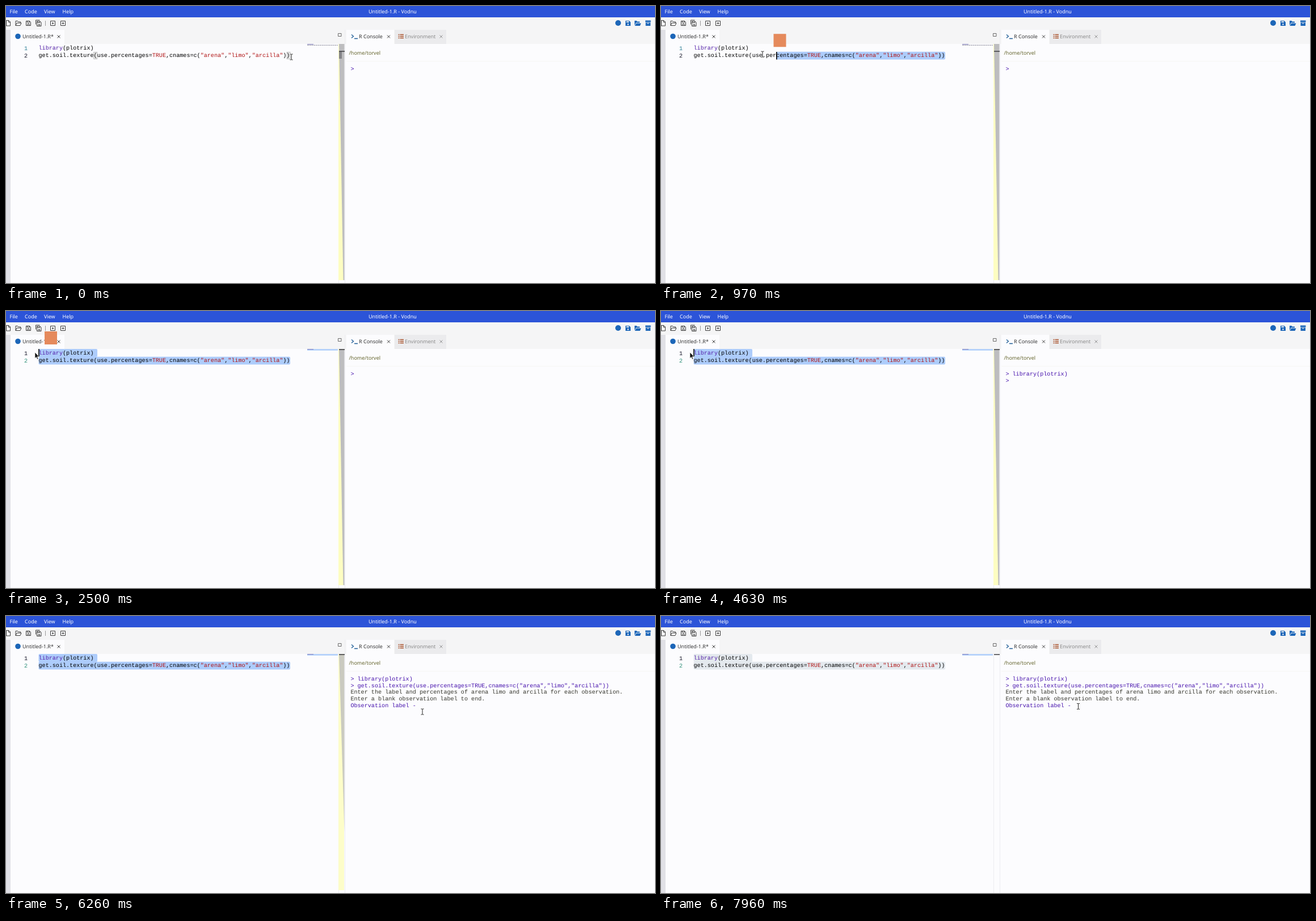
Write an HTML page that moves like this. It is 1144 px wide and 489 px high and loops after 8000 ms.

```html
<!DOCTYPE html>
<html lang="en">
<head>
<meta charset="utf-8">
<title>Soil texture in R</title>
<style>
  html, body { margin: 0; width: 100%; height: 100%; overflow: hidden; background: #fcfcfe; }
  svg { display: block; width: 1144px; height: 489px; }
  text { white-space: pre; text-rendering: geometricPrecision; }
  .ui { font: 9px "Noto Sans", "Open Sans", sans-serif; }
  .mono { font: 10.12px "Liberation Mono", monospace; }
  #console { font-size: 10.14px; }
  .line { fill: none; stroke: #3c3c3c; stroke-width: 1; }
  .blue { fill: #1c66b8; }
  .str { fill: #b01515; }
  .cmd { fill: #4510ac; }
  .out { fill: #35352c; }
</style>
</head>
<body>
<svg viewBox="0 0 1144 489">
  <!-- window chrome -->
  <rect width="1144" height="489" fill="#fcfcfe"/>
  <rect width="1144" height="20" fill="#2c54d8"/>
  <g class="ui" fill="#fff">
    <text x="6.5" y="13">File</text>
    <text x="33" y="13">Code</text>
    <text x="67" y="13">View</text>
    <text x="99.5" y="13">Help</text>
    <text x="639" y="13">Untitled-1.R - Vodnu</text>
  </g>
  <rect y="20" width="1144" height="47" fill="#f5f5f6"/>
  <rect y="42" width="8" height="447" fill="#e0e0e6"/>

  <!-- toolbar -->
  <g class="line">
    <path d="M.5 25.5h4.500l2.500 2.500v7h-7zM4.500 25.500v3h3"/>
    <path d="M17 34.500v-8h3.500l1.200 1.500h4v2M17 34.500l2-4.500h8l-2 4.500z"/>
    <path d="M35.500 26.500h6l2 2v6h-8zM37.500 26.500v2.500h4v-2.500M38 34v-2.500h3v2.500"/>
    <path d="M52.500 32.500v-7.500h7M54.500 27h5.500l2 2v6.500h-7.500zM56 27v2.500h3.500v-2.500M57 35v-2.500h2.500v2.500"/>
    <path d="M69.500 26v9" stroke="#999"/>
    <path d="M78.500 26.500h8v8h-8zM96.500 26.500h8v8h-8zM98.500 30.500h4M100.500 28.500v4"/>
    <path d="M81.500 28.500v4l3-2z" fill="#3c3c3c" stroke="none"/>
  </g>
  <g class="blue">
    <circle cx="1079" cy="30" r="5"/>
    <path d="M1092 26h6.500l2.500 2.500v6.500h-9z"/>
    <path d="M1108 34.500v-8.500h3.500l1.200 1.500h4.300v2h-6.500z"/>
    <path d="M1111 30.500h8.500l-2 4.500h-9z"/>
    <path d="M1127 25.500h9.500v3h-9.500zM1127.500 29.300h8.500v5.700h-8.500z"/>
    <path d="M1093.500 27h4.500v2h-4.500zM1130 30.300h3.500v1h-3.500z" fill="#f5f5f6"/>
    <circle cx="1096.500" cy="32.200" r="1.200" fill="#f5f5f6"/>
  </g>

  <!-- tabs -->
  <path d="M8 42h95v26h-95zM600 42h84v26h-84z" fill="#fcfcfe"/>
  <rect x="685" y="42" width="91" height="25" fill="#ebebed"/>
  <circle class="blue" cx="21" cy="53.500" r="4.800"/>
  <g class="ui" fill="#333">
    <text x="29" y="57">Untitled-1.R*</text>
    <text x="622" y="57">R Console</text>
    <text x="703" y="57" fill="#8a8a8a">Environment</text>
    <text x="604.500" y="86" fill="#66662f">/home/torvel</text>
  </g>
  <g class="line">
    <path id="x" d="M90.500 51.500l5 5m0-5l-5 5"/>
    <use href="#x" x="581.500"/>
    <use href="#x" x="674" opacity=".5"/>
    <path d="M585.500 48.500h5.500v5h-5.500z" stroke="#6a6a6a"/>
    <path d="M609 50.500l3.500 3-3.500 3M614 57.500h6" stroke="#1e5c96" stroke-width="1.300"/>
    <path d="M691.500 50.500h2m1 0h6.500M691.500 53.500h2m1 0h6.500M691.500 56.500h2m1 0h6.500" stroke="#a84f2a" stroke-width="1.700"/>
    <path d="M586.500 67v422M597.500 42v447" stroke="#ececf1"/>
    <path d="M600 97.500h544" stroke="#f6f6f3"/>
  </g>

  <!-- scrollbar -->
  <rect id="track" x="586" y="67" width="10" height="417" fill="#fdfdc2"/>
  <polygon id="thumb" fill="#bdbdbf"/>
  <rect id="bracketMark" x="587" y="80" width="5" height="13" fill="#858589"/>
  <rect id="lineMark" x="587" width="10" height="1.500" fill="#3d3d40"/>

  <!-- minimap -->
  <rect id="mapSel" x="531" y="67" width="54" height="2.800" fill="#b4d1fa"/>
  <path d="M531 67.700h11" stroke="#7a78ba"/>
  <path id="mapText" d="M531 69.200h54" stroke="#8d8d9d" stroke-dasharray="3 .7"/>

  <!-- editor -->
  <g id="sel">
    <rect id="sel1" y="67" height="14" rx="2"/>
    <rect id="sel2" y="80.700" height="13.800" rx="2"/>
  </g>
  <g id="brackets" fill="#ededed" stroke="#b5b5b5" stroke-width=".8">
    <rect x="154.700" y="81.500" width="6" height="12"/>
    <rect x="495" y="81.500" width="6" height="12"/>
  </g>
  <g class="mono">
    <text id="num1" x="32" y="77.500">1</text>
    <text id="num2" x="32" y="91.200">2</text>
    <text x="57.500" y="77"><tspan fill="#5320a8">library</tspan>(plotrix)</text>
    <text x="57.500" y="90">get.soil.texture(use.percentages=<tspan class="str">TRUE</tspan>,cnames=c(<tspan class="str">"arena"</tspan>,<tspan class="str">"limo"</tspan>,<tspan class="str">"arcilla"</tspan>))</text>
  </g>
  <rect id="caret" width="1.600" height="13.500"/>
  <rect id="flag" width="22" height="23" fill="#e58a5c"/>

  <!-- console -->
  <g class="mono" id="console"></g>

  <!-- pointers -->
  <g id="beam" fill="none">
    <path d="M-2.500 -5h2l.5.500.500-.500h2M0-4.500v9M-2.500 5h2l.5-.500.500.500h2" stroke="#fff" stroke-width="2.200"/>
    <path d="M-2.500 -5h2l.5.500.500-.500h2M0-4.500v9M-2.500 5h2l.5-.500.500.500h2" stroke="#222"/>
  </g>
  <path id="arrow" d="M0 0v10.500l2.400-2.200 1.700 3.900 1.700-.8-1.700-3.700h3.300z" fill="#111" stroke="#fff" stroke-width=".6"/>
</svg>
<script>
const LOOP = 8000, LEFT = 57.5, CHAR = 6.075, END1 = 161, END2 = 501;
const LIB_AT = 4450, GET_AT = 5050, FLAG_OFF = 3100, BLUR_AT = 7000;
const $ = id => document.getElementById(id);
const clamp = (v, lo, hi) => Math.min(hi, Math.max(lo, v));
const show = (id, on) => $(id).setAttribute('display', on ? 'inline' : 'none');
const set = (id, attrs) => { for (const k in attrs) $(id).setAttribute(k, attrs[k]); };
const place = (id, x, y) => set(id, { transform: `translate(${x} ${y})` });

// time, x, y
const path = [
  [0, 503, 90], [400, 503, 89], [470, 501, 88], [570, 441, 87.5], [1000, 160, 85],
  [1220, 57, 72], [1700, 57, 72], [1880, 44, 71], [2070, 51, 73],
  [5250, 51, 73], [5650, 330, 108], [6000, 660, 160], [6200, 734, 169],
  [6650, 734, 169], [7300, 736, 159], [8000, 735.5, 159.5]
];

function mouse(t) {
  let i = 1;
  while (i < path.length - 1 && t > path[i][0]) i++;
  const [t0, x0, y0] = path[i - 1], [t1, x1, y1] = path[i];
  const k = clamp((t - t0) / (t1 - t0), 0, 1);
  return [x0 + (x1 - x0) * k, y0 + (y1 - y0) * k];
}

// text, class, first shown, last shown, row
const rows = [
  ['>', 'cmd', 0, LIB_AT, 0],
  ['> library(plotrix)', 'cmd', LIB_AT, LOOP, 0],
  ['>', 'cmd', LIB_AT, GET_AT, 1],
  ['> get.soil.texture(use.percentages=TRUE,cnames=c("arena","limo","arcilla"))', 'cmd', GET_AT, LOOP, 1],
  ['Enter the label and percentages of arena limo and arcilla for each observation.', 'out', GET_AT, LOOP, 2],
  ['Enter a blank observation label to end.', 'out', GET_AT, LOOP, 3],
  ['Observation label -', 'cmd', GET_AT, LOOP, 4]
].map(([text, cls, from, to, row]) => {
  const el = document.createElementNS('http://www.w3.org/2000/svg', 'text');
  el.textContent = text;
  el.setAttribute('class', cls);
  el.setAttribute('x', 607.4);
  el.setAttribute('y', 114.3 + row * 11.55);
  $('console').append(el);
  return { el, from, to };
});

function drawSelection(t) {
  const [mx, my] = mouse(Math.min(t - 40, 1650));
  const col = Math.round((clamp(mx, LEFT, END2) - LEFT) / CHAR);
  const first = my < 81;
  const x = LEFT + (first ? Math.min(col, 16) : col) * CHAR;
  const active = x < END2 - 1;

  show('sel', active);
  show('sel1', first);
  set('sel', { fill: t < BLUR_AT ? '#adccfb' : '#e4e9ee' });
  set('sel1', { x, width: Math.max(0, END1 - x) });
  const x2 = first ? LEFT : x;
  set('sel2', { x: x2, width: Math.max(0, END2 - x2) });

  show('brackets', !active);
  show('bracketMark', !active);
  show('mapSel', first);
  show('mapText', !first);
  set('lineMark', { y: first ? 67.3 : 79.3 });
  set('num1', { fill: first ? '#151528' : '#2d7f96' });
  set('num2', { fill: first ? '#2d8f78' : '#151528' });

  const blinkOn = t < 1930 || Math.floor((t - 1950) / 500) % 2 === 1;
  show('caret', active && blinkOn && t < BLUR_AT);
  set('caret', { x: x - .3, y: first ? 67 : 81 });

  const [fx, fy] = mouse(Math.min(t - 13, 1650));
  show('flag', active && t < FLAG_OFF);
  place('flag', fx + 11, fy - 36);
}

function drawScrollbar(t) {
  const fade = clamp((t - 5750) / 1000, 0, 1);
  const bottom = 484 - fade * 200;
  const tip = Math.min(596.5, 594.5 + fade * 4);
  set('track', { opacity: Math.min(1, 1.8 * (1 - fade)) });
  set('thumb', {
    points: `587,67 596.5,67 596.5,${bottom} ${tip},${bottom}`,
    opacity: Math.min(1, 1.6 * (1 - fade))
  });
}

function drawPointer(t) {
  const [x, y] = mouse(t);
  const gutter = x < 54;
  show('beam', !gutter);
  show('arrow', gutter);
  place(gutter ? 'arrow' : 'beam', x, y);
}

function render(t) {
  drawSelection(t);
  drawScrollbar(t);
  drawPointer(t);
  for (const { el, from, to } of rows)
    el.setAttribute('display', t >= from && t < to ? 'inline' : 'none');
}

function tick() {
  render(performance.now() % LOOP);
  requestAnimationFrame(tick);
}
tick();
</script>
</body>
</html>
```
